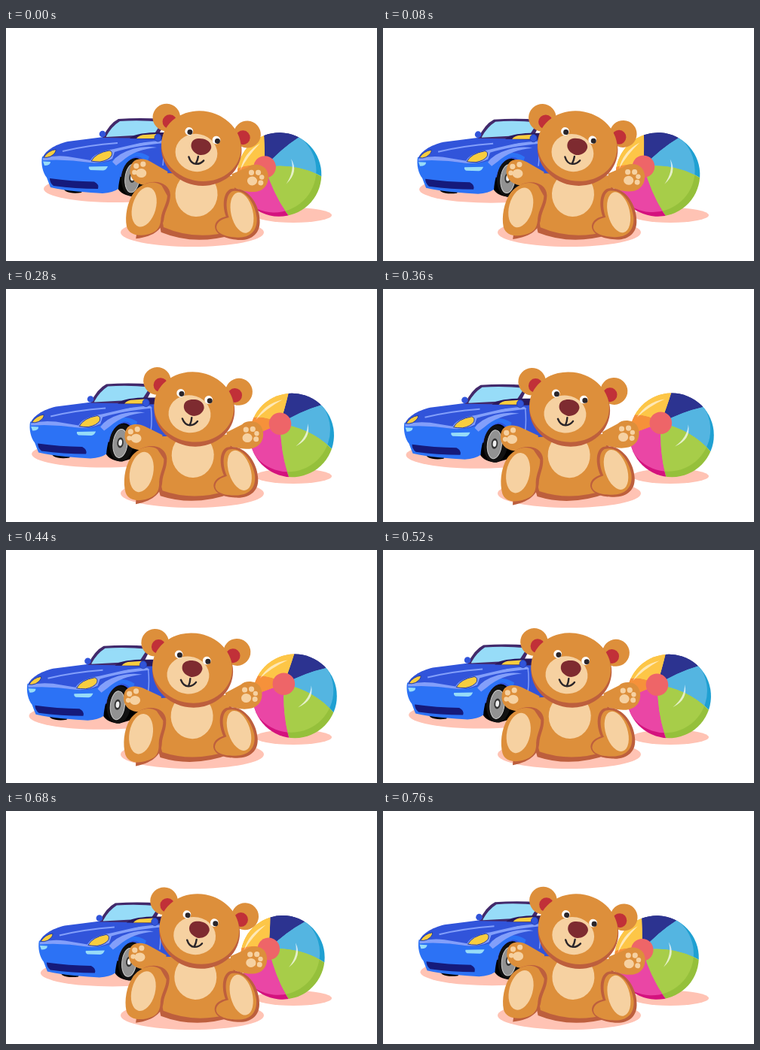
An HTML page that plays this animation: 492 by 310 pixels, repeating every 800 ms.

```html
<!DOCTYPE html>
<html lang="en">
<head>
<meta charset="utf-8">
<title>Toys</title>
<style>
html, body { margin: 0; width: 100%; height: 100%; overflow: hidden; background: #fff; }
svg { display: block; width: 492px; height: 310px; }
:root { --p: 0; }
.car { transform: translate(calc(20px - 20px * var(--p)), calc(7px * var(--p) - 7px)); }
.bear { transform-origin: 252px 286px; transform: rotate(calc(2.7deg - 5.4deg * var(--p))); }
.ball { transform: translate(calc(362.5px + 21px * var(--p)), calc(195px - .6px * var(--p))); }
.roll { transform: rotate(calc(21deg * var(--p) - 21deg)); }
.shadow { fill: #ffc3b4; }
.fur { fill: #dd8f3b; }
.shade { fill: #bd5f3d; }
.cream { fill: #f6d1a1; }
.red { fill: #c13038; }
.ink { fill: #2a2529; }
.royal { fill: #3154da; }
.bright { fill: #2c72f5; }
.pale { fill: #839ffa; }
.navy { fill: #151a7b; }
.plum { fill: #42296b; }
.sky { fill: #97dcf8; }
.gold { fill: #f8cd3f; }
</style>
</head>
<body>
<svg viewBox="0 0 492 310">
  <defs>
    <clipPath id="disc"><circle r="55.8"/></clipPath>
    <clipPath id="lit"><circle cx="-4.500" cy="-7.500" r="55.8"/></clipPath>
  </defs>

  <g class="car">
    <ellipse class="shadow" cx="125" cy="221" rx="95" ry="18"/>
    <path d="M52 217H84L80 226Q67 228 59 224Z"/>
    <path d="M128 220C126 196 138 174 160 172L185 180 180 222 150 231Q133 230 128 220Z"/>
    <path class="royal" d="M28 182C30 171 45 162 62 158Q86 155 109 152L190 152 225 155V210H170Q166 180 152 180 137 182 133 205L100 200Z"/>
    <path class="bright" d="M28 178C26 188 29 200 34 206Q37 214 39 219C60 224 90 226 108 227Q122 226 129 221C131 198 139 181 153 178Q163 178 166 190L170 178Q160 171 145 172 128 176 121 183 107 188 90 186 55 181 28 178Z"/>
    <path class="pale" d="M29 180Q45 176 62 178L92 183Q96 174 111 170 140 160 187 157L190 160Q150 164 124 172L121 181Q106 188 91 186 60 181 29 183Z"/>
    <path class="royal" d="M47 176Q70 167 104 164 142 159 171 157L123 168Q100 172 93 181 70 176 47 176Z"/>
    <path d="M55 171Q88 163 128 160" fill="none" stroke="#839ffa" stroke-width="2"/>
    <path class="pale" d="M121 185Q128 174 148 168 166 163 180 166 152 168 134 184L126 190Z"/>
    <path d="M188 158Q190 174 188 190" fill="none" stroke="#839ffa" stroke-width="1.5"/>

    <path class="plum" d="M108 153Q117 134 129 128 158 126 187 128L191 132 180 154Z"/>
    <path class="sky" d="M113 151Q120 138 131 131 158 129 187 132L176 149Q145 150 113 152Z"/>
    <path d="M144 154Q150 147 177 146L225 146V154L185 155Z" fill="#2b1a5c"/>
    <path class="gold" d="M153 154Q157 149 165 149L180 148 177 154Z"/>
    <circle class="royal" cx="108" cy="148" r="4.3"/>
    <ellipse cx="181.500" cy="153" rx="4.500" ry="5" fill="#3154da" stroke="#2744b8"/>

    <g stroke="#233a9e" stroke-width="1">
      <path class="gold" d="M30 179Q36 170 46 168.500 47 173 39 178 34 180 30 179Z"/>
      <path class="gold" d="M93 184Q99 173 117 170 122 171 120 177 116 183 105 185 97 185 93 184Z"/>
    </g>
    <path class="sky" d="M29 184.500L39 185Q39 190 31 190ZM90 191.500L115 191Q113 196 109 196.500L92 196Q89 194 90 191.500Z"/>
    <path class="navy" d="M38 207Q67 211 97 211.500 104 215 102 221 72 221 43 217 38 213 38 207Z"/>

    <g transform="rotate(6 148 206)">
      <ellipse cx="149" cy="206" rx="16" ry="25" fill="#111"/>
      <ellipse cx="147.500" cy="207" rx="9.500" ry="19" fill="#929292" stroke="#ccc"/>
      <ellipse cx="147.500" cy="206" rx="4.200" ry="7" fill="#333"/>
      <ellipse cx="147.500" cy="206" rx="2.400" ry="4.200" fill="#eee"/>
    </g>
  </g>

  <ellipse class="shadow" cx="381" cy="249" rx="51" ry="10"/>
  <g class="ball">
    <g class="roll" clip-path="url(#disc)">
      <g id="dark"></g>
      <g id="light" clip-path="url(#lit)"></g>
      <path d="M-46-24Q-34-44-9-48-31-38-46-24Z" fill="#fff" opacity=".6"/>
      <path d="M22-14Q26 6 4 15 21 3 22-14Z" fill="#fff" opacity=".7"/>
      <circle cx="-14.500" cy="-16.300" r="14.800" fill="#ee6568"/>
    </g>
  </g>

  <ellipse class="shadow" cx="247" cy="272" rx="95" ry="19"/>
  <g class="bear">
    <path class="shade" d="M204 195H299Q310 235 300 273 250 290 205 274 194 235 204 195Z"/>
    <path class="fur" d="M206 195H297Q305 235 296 269 250 283 208 267 200 235 206 195Z"/>
    <ellipse class="cream" cx="249.500" cy="221" rx="28" ry="30"/>

    <path class="fur" d="M163 183C168 176 180 177 187 181L210 193 207 215 188 212C172 214 161 207 160 195Q160 187 163 183Z"/>
    <path class="fur" d="M295 192L316 182C322 176 336 177 341 185 347 196 343 211 329 214 318 216 306 213 297 209Z"/>
    <g class="cream">
      <ellipse cx="175" cy="196.500" rx="7" ry="6"/>
      <circle cx="168" cy="187.500" r="3.600"/>
      <circle cx="177" cy="184.500" r="3.600"/>
      <circle cx="166" cy="196" r="3.200"/>
      <ellipse cx="322.500" cy="200" rx="6.600" ry="6"/>
      <circle cx="321" cy="189" r="3.600"/>
      <circle cx="330" cy="188.500" r="3.600"/>
      <circle cx="335" cy="194.500" r="3.200"/>
      <circle cx="334" cy="202" r="3.500"/>
    </g>

    <path class="shade" d="M180 211C196 203 214 209 215 224 215 238 209 244 208 256 207 268 198 280 172 284 163 275Z"/>
    <path class="fur" d="M203 212C192 204 176 210 167 222 158 236 156 255 159 268 163 282 182 281 194 275 202 271 204 264 204 255 205 243 211 236 211 225 210 217 203 212Z"/>
    <ellipse class="cream" cx="181" cy="241.500" rx="15.500" ry="27" transform="rotate(13 181 241.500)"/>

    <path class="shade" d="M295 212C318 207 334 232 335 252 337 272 322 281 304 279 290 278 276 273 276 262 277 254 284 251 290 249 284 234 285 216 295 212Z"/>
    <path class="fur" d="M297 215C315 211 328 230 331 249 333 269 320 277 304 276 291 276 278 272 278 263 279 255 287 252 294 250 288 235 289 219 297 215Z"/>
    <ellipse class="cream" cx="311" cy="243" rx="14.500" ry="27.500" transform="rotate(-16 311 243)"/>

    <circle class="fur" cx="205" cy="121" r="18.300"/>
    <circle class="red" cx="209.500" cy="126.500" r="9.500"/>
    <circle class="fur" cx="313" cy="138.500" r="18"/>
    <circle class="red" cx="307.500" cy="143" r="9.500"/>
    <g transform="rotate(9 253 159)">
      <ellipse class="shade" cx="253.500" cy="160.500" rx="53.500" ry="49"/>
      <ellipse class="fur" cx="252.500" cy="157" rx="53" ry="46.500"/>
      <ellipse class="cream" cx="248" cy="167" rx="28" ry="25"/>
      <path d="M239 157C239 149 247 147 253 147 261 147 266 152 266 157 265 165 258 169 252 169 246 168 239 164 239 157Z" fill="#7e2b30"/>
    </g>
    <path d="M249.500 171Q249 176 247 180M237 172Q240 181 247 181 253 181 257 176" fill="none" stroke="#2a2529" stroke-width="2.400" stroke-linecap="round"/>
    <g fill="#fff"><circle cx="235.800" cy="138" r="5.400"/><circle cx="272.500" cy="148" r="5.400"/></g>
    <g class="ink"><circle cx="237" cy="139" r="3.500"/><circle cx="274" cy="149.200" r="3.500"/></g>
  </g>
</svg>
<script>
const R = 57, HUB = "-14.5 -16.3";
// start angle, seam control point, lit colour, shaded colour
const panels = [
  [-90, "-6 -38", "#2c3390", "#242a7c"],
  [-41, "13 -31", "#54b5e1", "#1fa0d2"],
  [24, "27 -7", "#a7cd49", "#95c03b"],
  [98, "-17 25", "#ea46a5", "#d4127e"],
  [181, "-35 -9", "#f6913a", "#e87f2a"],
  [209, "-30 -28", "#fdc647", "#f3b52f"]
];
const rim = deg => {
  const a = deg * Math.PI / 180;
  return `${(R * Math.cos(a)).toFixed(1)} ${(R * Math.sin(a)).toFixed(1)}`;
};
const paint = (id, tone) => {
  document.getElementById(id).innerHTML = panels.map((panel, i) => {
    const next = panels[(i + 1) % panels.length];
    return `<path fill="${panel[tone]}" d="M${HUB}Q${panel[1]} ${rim(panel[0])}` +
      `A${R} ${R} 0 0 1 ${rim(next[0])}Q${next[1]} ${HUB}Z"/>`;
  }).join("");
};
paint("light", 2);
paint("dark", 3);

// Sine sway, held in 40 ms steps
const LOOP = 800, STEP = 40;
const draw = now => {
  const t = Math.floor((now % LOOP) / STEP + 1e-3) * STEP;
  const p = (1 - Math.cos(2 * Math.PI * t / LOOP)) / 2;
  document.documentElement.style.setProperty("--p", p.toFixed(4));
  requestAnimationFrame(draw);
};
requestAnimationFrame(draw);
</script>
</body>
</html>
```
